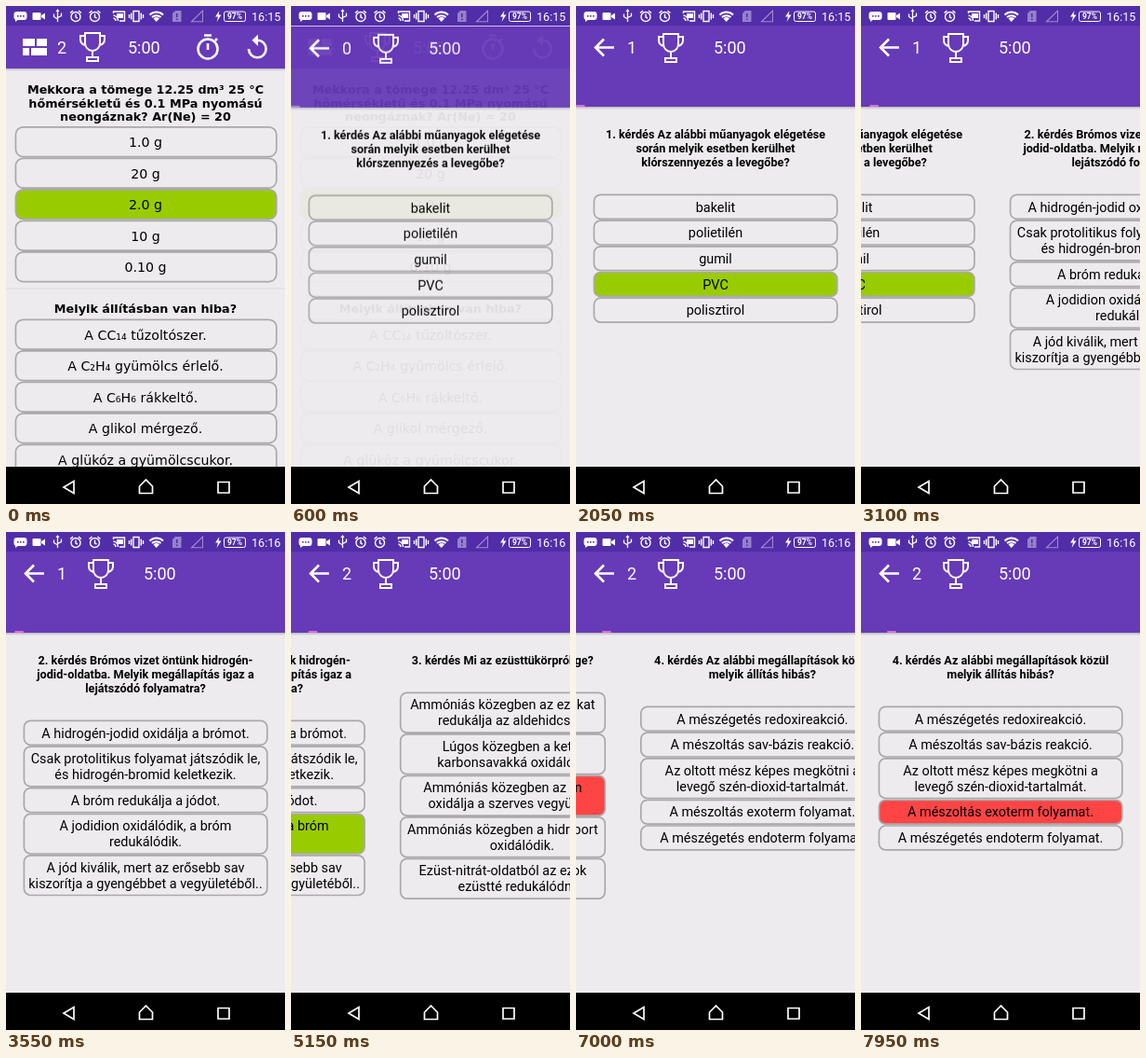
An HTML page that plays this animation: 300x534 px, repeating every 8000 ms.

```html
<!DOCTYPE html>
<html lang="hu">
<head>
<meta charset="utf-8">
<title>Kémia kvíz</title>
<style>
html, body { margin: 0; width: 100%; height: 100%; overflow: hidden; background: #000; }
svg { display: block; width: 300px; height: 534px; }
text { font-family: Roboto, sans-serif; }
.mid { text-anchor: middle; }
.ask { font-size: 12.65px; font-weight: 700; }
.answer { font-size: 14.45px; }
.wide { font-family: "DejaVu Sans", sans-serif; }
.wide.ask { font-size: 12.8px; }
.wide.answer { font-size: 14.2px; }
.bar { font-size: 18px; fill: #fff; }
.line { fill: none; stroke: #fff; stroke-width: 2; }
.box { stroke: #aaa8ab; stroke-width: 1.7; }
</style>
</head>
<body>
<svg id="stage" viewBox="0 0 300 534"></svg>
<script>
const PAPER = '#eeebef', GREEN = '#99cc00', RED = '#ff4444';

const questions = [
  { ask: ['1. kérdés Az alábbi műanyagok elégetése', 'során melyik esetben kerülhet', 'klórszennyezés a levegőbe?'],
    answers: ['bakelit', 'polietilén', 'gumil', 'PVC', 'polisztirol'],
    pick: 3, at: 2050, fill: GREEN },
  { ask: ['2. kérdés Brómos vizet öntünk hidrogén-', 'jodid-oldatba. Melyik megállapítás igaz a', 'lejátszódó folyamatra?'],
    answers: ['A hidrogén-jodid oxidálja a brómot.', 'Csak protolitikus folyamat játszódik le,|és hidrogén-bromid keletkezik.',
      'A bróm redukálja a jódot.', 'A jodidion oxidálódik, a bróm|redukálódik.',
      'A jód kiválik, mert az erősebb sav|kiszorítja a gyengébbet a vegyületéből..'],
    pick: 3, at: 4150, fill: GREEN },
  { ask: ['3. kérdés Mi az ezüsttükörpróba lényege?'],
    answers: ['Ammóniás közegben az ezüstionokat|redukálja az aldehidcsoport.', 'Lúgos közegben a ketonok|karbonsavakká oxidálódnak.',
      'Ammóniás közegben az ezüstion|oxidálja a szerves vegyületeket.', 'Ammóniás közegben a hidroxilcsoport|oxidálódik.',
      'Ezüst-nitrát-oldatból az ezüstionok|ezüstté redukálódnak'],
    pick: 2, at: 5950, fill: RED },
  { ask: ['4. kérdés Az alábbi megállapítások közül', 'melyik állítás hibás?'],
    answers: ['A mészégetés redoxireakció.', 'A mészoltás sav-bázis reakció.', 'Az oltott mész képes megkötni a|levegő szén-dioxid-tartalmát.',
      'A mészoltás exoterm folyamat.', 'A mészégetés endoterm folyamat.'],
    pick: 3, at: 7850, fill: RED }
];
// Page turns: when they show, and how far the 200 ms scroll has run by then
const turns = [[3100, 28], [5150, 40], [7000, 60]];

const rect = (x, y, w, h, fill, more = '') => `<rect x="${x}" y="${y}" width="${w}" height="${h}" fill="${fill}" ${more}/>`;
const line = (d, more = '') => `<path class="line" d="${d}" ${more}/>`;
const solid = (d, more = '') => `<path fill="#fff" d="${d}" ${more}/>`;
const label = (x, y, cls, str, more = '') => `<text x="${x}" y="${y}" class="${cls}" ${more}>${str}</text>`;
const at = (x, y, content) => `<g transform="translate(${x} ${y})">${content}</g>`;
const lines = (list, y, step, cls) => list.map((s, i) => label(150, y + i * step, 'mid ' + cls, s)).join('');

const trophy = (x, y) => at(x, y, line('M6 1H22V12a8 8 0 0 1-16 0ZM6 4H1V8a6 6 0 0 0 6 6M22 4H27V8a6 6 0 0 1-6 6M14 20v6M8 31V27H20V31Z'));

function toolbar(bottom) {
  return rect(0, bottom, 300, 3, 'url(#shade)') + rect(0, 21, 300, bottom - 21, '#673ab7');
}

function listBlock(ask, answers, askY, top, chosen) {
  return lines(ask, askY, 14.5, 'wide ask') + answers.map((s, i) => {
    const y = top + i * 33.5;
    return rect(10.4, y, 280.4, 31.8, i === chosen ? GREEN : PAPER, 'rx="8" class="box"') +
      label(150, y + 21.2, 'mid wide answer', s);
  }).join('');
}

function listScreen() {
  return rect(0, 0, 300, 534, PAPER) + toolbar(67) +
    solid('M18 35H31V43H18ZM33 35H44V43H33ZM18 45H25V53H18ZM27 45H44V53H27Z') +
    label(55, 51, 'bar', '2') + trophy(79, 28) + label(131, 51, 'bar', '5:00') +
    line('M206.5 46a10.5 10.5 0 1 0 21 0a10.5 10.5 0 1 0-21 0M213 31.5h8M217 40v7M225 37l2-2', 'style="stroke-width:2.6"') +
    line('M261 46a9.3 9.3 0 1 0 9.3-9.3', 'style="stroke-width:2.6"') + solid('M271 30.5V43L264.5 36.7Z') +
    listBlock(['Mekkora a tömege 12.25 dm³ 25 °C', 'hőmérsékletű és 0.1 MPa nyomású', 'neongáznak? Ar(Ne) = 20'],
      ['1.0 g', '20 g', '2.0 g', '10 g', '0.10 g'], 94.3, 129.8, 2) +
    rect(0, 302.5, 300, 1, '#dcd9dd') +
    listBlock(['Melyik állításban van hiba?'],
      ['A CC₁₄ tűzoltószer.', 'A C₂H₄ gyümölcs érlelő.', 'A C₆H₆ rákkeltő.', 'A glikol mérgező.', 'A glükóz a gyümölcscukor.'], 329.3, 336.3);
}

function page(q, index) {
  let top = 156.9 + 15 * q.ask.length;
  const boxes = q.answers.map((s, i) => {
    const rows = s.split('|'), h = rows.length > 1 ? 43.6 : 26.8, y = top;
    top += h + 0.9;
    return rect(19.4, y + .5, 261.4, h - .9, PAPER, `rx="7" class="box" id="a${index}${i}"`) +
      lines(rows, y + h / 2 + 5.2 - (rows.length - 1) * 8.45, 16.9, 'answer');
  });
  return at(index * 300, 0, lines(q.ask, 142.3, 14.85, 'ask') + boxes.join(''));
}

function quizScreen() {
  return rect(0, 0, 300, 534, PAPER) + `<g id="pages">${questions.map(page).join('')}</g>` + toolbar(108) +
    rect(0, 106, 9.4, 2, '#d96fdc', 'id="progress"') +
    line('M41 44.5H21M30 35.5L21 44.5L30 53.5', 'style="stroke-width:2.6"') +
    label(55, 51, 'bar', '0', 'id="score"') + trophy(88, 29) + label(148, 51, 'bar', '5:00');
}

function statusBar() {
  const alarm = x => at(x, 4, line('M1.5 7.5a5 5 0 1 0 10 0a5 5 0 1 0-10 0M6.5 4.5V8L8.5 9M.5 3.5L3.5 1M12.5 3.5L9.5 1', 'style="stroke-width:1.4"'));
  return rect(0, 0, 300, 21, '#512da8') +
    rect(8.5, 6, 14, 9, '#fff', 'rx="3"') + solid('M10 14h4l-4 3z') +
    [12, 15, 18].map(x => rect(x, 10, 1.6, 1.6, '#512da8')).join('') +
    rect(28.5, 7, 9, 8, '#fff', 'rx="1"') + solid('M38 10L42 7.5V14.5L38 12Z') +
    line('M55.5 17V5M55.5 14L51.5 11.5V8.5M55.5 12.5L59.5 10.5V7.5', 'style="stroke-width:1.3"') + solid('M53.5 6L55.5 3L57.5 6Z') +
    alarm(68.5) + alarm(89) +
    line('M115.5 8V6H127.5V16H122M115.5 10a6 6 0 0 1 5 6M115.5 13a3 3 0 0 1 2.5 3', 'style="stroke-width:1.4"') +
    rect(119, 8, 7, 5, '#fff') +
    line('M137 5.5H143V16.5H137ZM134.7 7.5V14.5M132.5 9V13M145.3 7.5V14.5M147.5 9V13', 'style="stroke-width:1.4"') +
    line('M154.5 9.5a10.5 10.5 0 0 1 14.5 0M157 12a7 7 0 0 1 9.5 0', 'style="stroke-width:2"') + solid('M158.5 13.5a5 5 0 0 1 6.5 0L161.7 17Z') +
    solid('M179 8L182 5H188.5V17H179Z', 'opacity=".4"') + rect(183, 8, 1.6, 4, '#512da8') + rect(183, 13.5, 1.6, 1.6, '#512da8') +
    line('M199.5 16.8H211.5V5Z', 'opacity=".45" style="stroke-width:1.1"') +
    solid('M229.5 5L225 11.5H228L226.5 17L231.5 9.5H228.5Z') +
    line('M236.5 6H255.5Q257.5 6 257.5 8V14.5Q257.5 16.5 255.5 16.5H236.5Q234.5 16.5 234.5 14.5V8Q234.5 6 236.5 6Z', 'style="stroke-width:1"') +
    label(246, 14.4, 'mid', '97%', 'fill="#fff" font-size="8.5" font-weight="700"') +
    label(264, 15.7, '', '16:15', 'id="clock" fill="#fff" font-size="12.6"');
}

const navBar = () => rect(0, 494, 300, 40, '#000') +
  line('M73 509.5V522.5L62 516ZM143.5 515L150.5 508L157.5 515V522.5H143.5ZM228 510.5H240V522H228Z', 'style="stroke-width:1.7"');

const stage = document.getElementById('stage');
stage.innerHTML = `<defs><linearGradient id="shade" x2="0" y2="1">
  <stop stop-color="#000" stop-opacity=".22"/><stop offset="1" stop-color="#000" stop-opacity="0"/></linearGradient></defs>
  <g>${listScreen()}</g><g id="quiz">${quizScreen()}</g>${statusBar()}${navBar()}`;

const el = id => document.getElementById(id);
const clamp = v => Math.max(0, Math.min(1, v));

function render(now) {
  const t = Math.floor(now % 8000 / 50) * 50; // 20 pictures a second

  const enter = clamp((t - 430) / 270);
  el('quiz').setAttribute('opacity', clamp(enter * 1.5));
  el('quiz').setAttribute('transform', `translate(0 ${43 * (1 - enter) ** 4})`);

  let scroll = 0, current = 0;
  for (const [start, lead] of turns) {
    if (t < start) break;
    current++;
    scroll += 300 * (1 - (1 - clamp((t - start + lead) / 200)) ** 5);
  }
  el('pages').setAttribute('transform', `translate(${-scroll} 0)`);
  el('progress').setAttribute('x', current * 9.4);
  el('progress').setAttribute('fill', t < 1250 ? '#a57fd4' : '#d96fdc');

  questions.forEach((q, i) => el(`a${i}${q.pick}`).setAttribute('fill', t >= q.at ? q.fill : PAPER));
  el('score').textContent = questions.filter(q => q.fill === GREEN && t >= q.at).length;
  el('clock').textContent = t < 3550 ? '16:15' : '16:16';
  requestAnimationFrame(render);
}
requestAnimationFrame(render);
</script>
</body>
</html>
```
